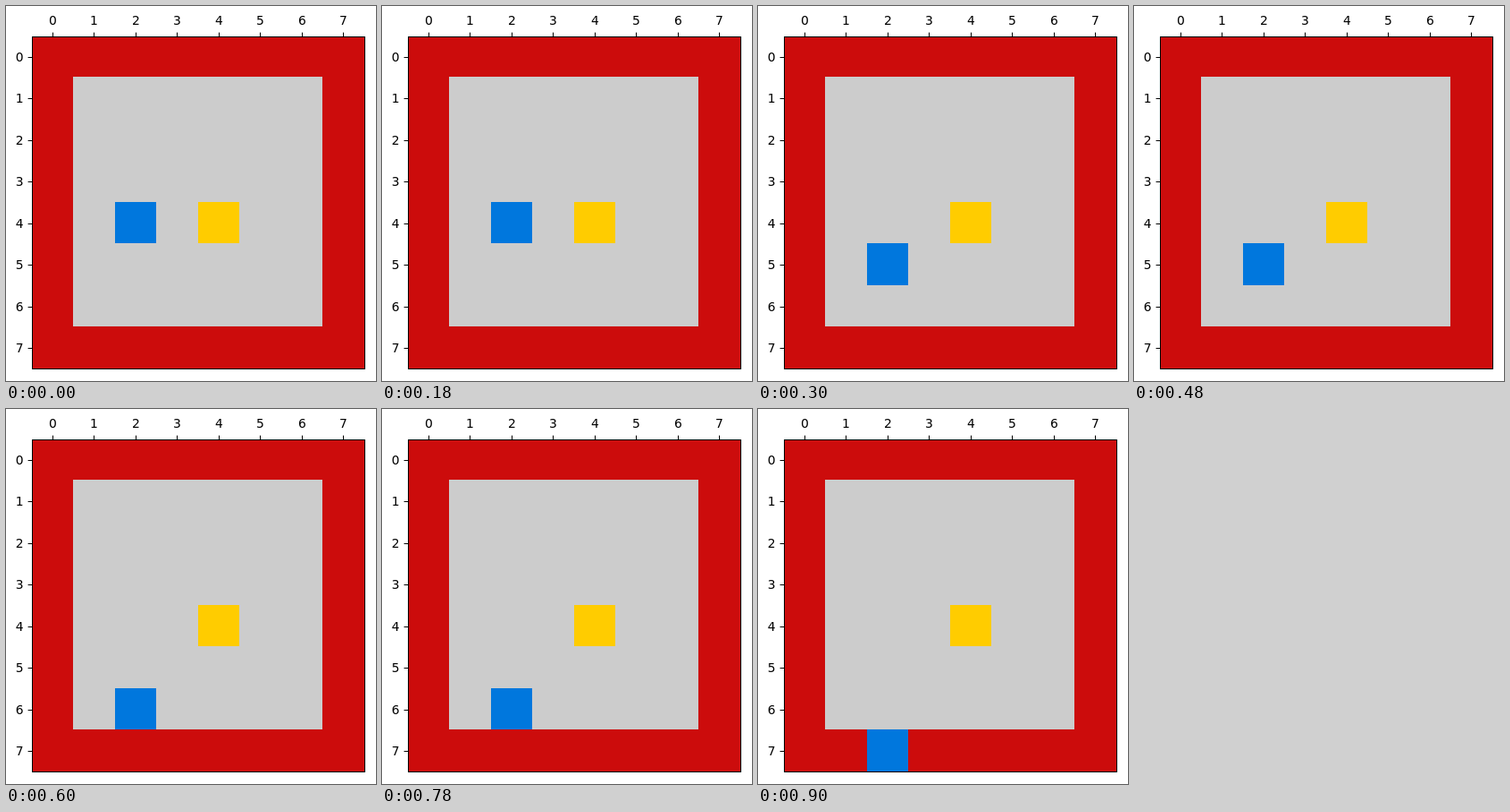
An HTML page with a canvas that plays this animation: 414 px wide and 419 px high, repeating every 1.2 s.

```html
<!DOCTYPE html>
<html lang="en">
<head>
<meta charset="utf-8">
<style>
  html, body { margin: 0; width: 100%; height: 100%; overflow: hidden; background: #fff; }
  canvas { display: block; }
</style>
</head>
<body>
<canvas id="stage" width="414" height="419"></canvas>
<script>
const ctx = document.getElementById('stage').getContext('2d');
const COUNT = 8, CELL = 46.45, STEP = 300;
const LEFT = 29, TOP = 34, RIGHT = 401, BOTTOM = 405;

const edgeX = i => Math.round(28.9 + CELL * i);
const edgeY = i => Math.round(32.9 + CELL * i);
const tickAt = (start, i) => Math.floor(start + 0.1 + CELL * (i + 0.5));

function rect(color, x, y, w, h) {
  ctx.fillStyle = color;
  ctx.fillRect(x, y, w, h);
}

function cells(color, col, row, size = 1) {
  const x = edgeX(col), y = edgeY(row);
  rect(color, x, y, edgeX(col + size) - x, edgeY(row + size) - y);
}

function drawAxes() {
  ctx.strokeStyle = '#000';
  ctx.lineWidth = 1;
  ctx.strokeRect(LEFT + 0.5, TOP + 0.5, RIGHT - LEFT, BOTTOM - TOP);
  ctx.font = '13.89px "DejaVu Sans", sans-serif';
  ctx.textAlign = 'center';
  for (let i = 0; i < COUNT; i++) {
    const x = tickAt(LEFT, i), y = tickAt(TOP, i);
    rect('#000', x, TOP - 4.4, 1, 4.4);
    rect('#000', LEFT - 4.4, y, 4.4, 1);
    ctx.fillText(i, x + 0.5, 21);
    ctx.fillText(i, 15.2, y + 5);
  }
}

function draw(time) {
  const row = 4 + Math.floor(time / STEP) % 4;
  rect('#fff', 0, 0, 414, 419);
  rect('#cc0c0c', LEFT, TOP, RIGHT - LEFT, BOTTOM - TOP);
  cells('#ccc', 1, 1, 6);
  cells('#fc0', 4, 4);
  cells('#07d', 2, row);
  drawAxes();
}

const start = performance.now();
function loop() {
  draw(performance.now() - start);
  requestAnimationFrame(loop);
}
loop();
</script>
</body>
</html>
```
